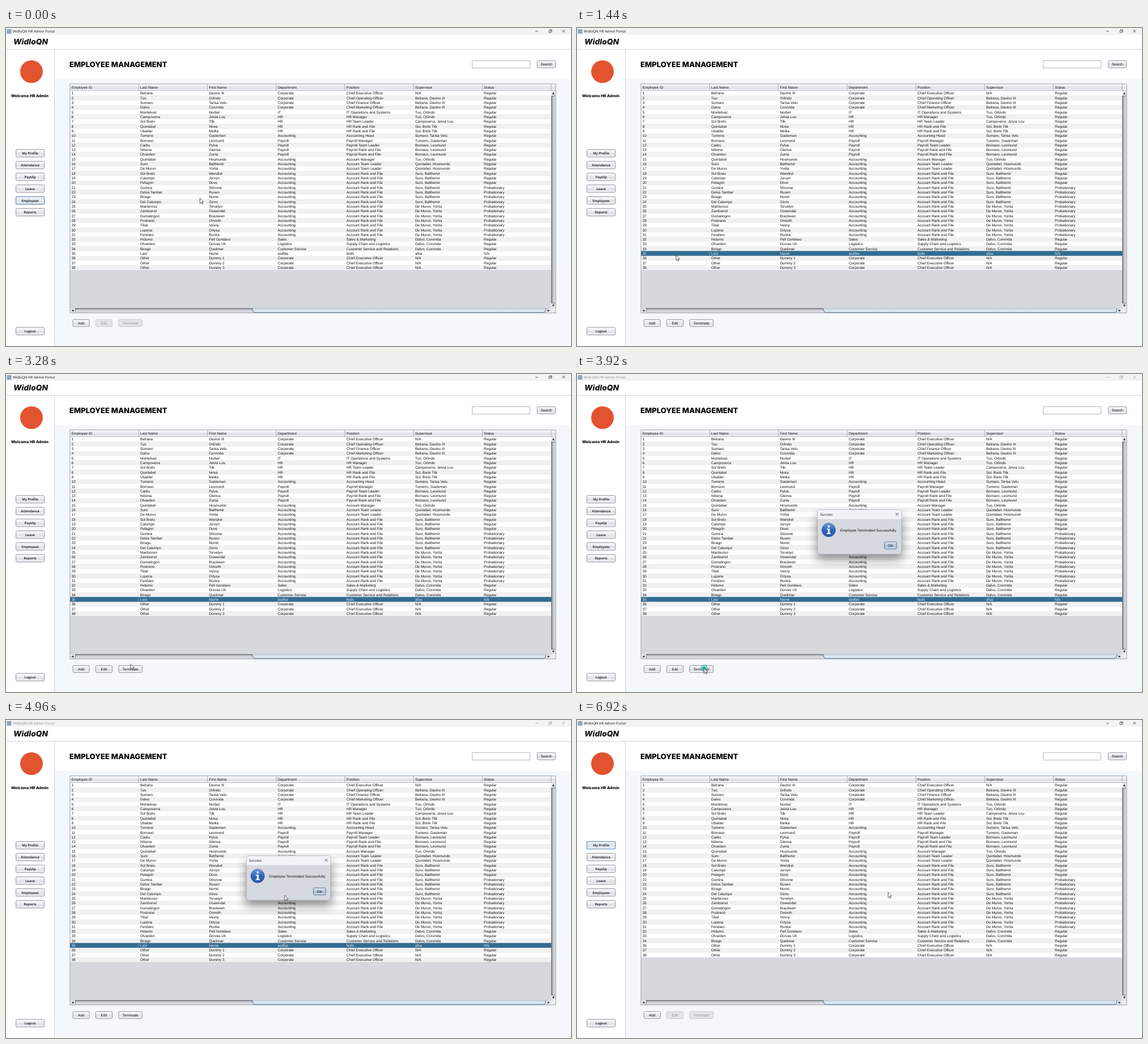
Animation, 998 px wide and 561 px high, one loop 7.48 s. Source, as an HTML page:

```html
<!DOCTYPE html>
<html lang="en">
<head>
<meta charset="utf-8">
<title>Employee Management</title>
<style>
  html, body { margin: 0; height: 100%; overflow: hidden; background: #fff; }
  svg { display: block; width: 100vw; height: 100vh; }
  text { font: 6.4px "Liberation Sans", Arial, sans-serif; fill: #111; white-space: pre; text-rendering: geometricPrecision; }
  .ui { font: 6.1px "Open Sans", sans-serif; }
  .nav { font: 600 5.9px "Open Sans", sans-serif; }
  .brand { font: italic 800 13.8px Inter, sans-serif; }
  .head { font: 800 13.05px Inter, sans-serif; fill: #000; }
  .hello { font: 800 6.8px Inter, sans-serif; fill: #000; }
  .mid { text-anchor: middle; }
  .btn rect { fill: url(#face); stroke: #858a94; stroke-width: .9; }
  .btn.focus rect { fill: url(#glow); stroke: #5f86ad; stroke-width: 1.1; }
  .btn.main rect { fill: url(#blue); stroke: #4f6a88; }
  .btn.off rect { fill: #e2e5e8; stroke: #c2c6cb; }
  .btn.off text { fill: #929599; }
  .picked text { fill: #e6eef4; }
  .inactive text { fill: #8c8c8c; }
  .inactive path { stroke: #999; }
</style>
</head>
<body>
<svg id="stage" viewBox="0 0 998 561" preserveAspectRatio="none"></svg>
<script>
const LOOP = 7480, STEP = 40, ROW = 8.316, TOP = 111, COL = 121.4, LEFT = 113;

const people = `Belrana|Davino III
Tuo|Orlindo
Sumaro|Tarisa Velu
Dalvo|Corvinda
Montelvaz|Norbel
Campoverra|Jelvia Lou
Sol Brelo|Tilk
Quintabel|Nirea
Ubalder|Melka
Tumeno|Gasteman
Bornavo|Leomund
Cadru|Pylva
Nibona|Glenva
Olvarden|Zunia
Quintabel|Hosmundo
Suro|Balthemir
De Murvo|Yorita
Sol Brelo|Wendrel
Calumpo|Jorvyn
Pelagrin|Dovo
Gumira|Shivone
Delos Tamber|Ruxen
Birago|Nomri
Del Calumpo|Ginro
Maribonso|Torvelyn
Zamborrel|Oswendal
Dumalingon|Brackwen
Postrano|Omreth
Tibal|Vesny
Lupona|Ortysa
Fendaro|Runka
Hidumo|Pell Gondavo
Olvarden|Dorvas Uli
Birago|Quelimar
Last|Name
Other|Dummy 1
Other|Dummy 2
Other|Dummy 3`.split('\n').map(s => s.split('|'));

// "a*3|b" -> [a, a, a, b]
const runs = s => s.split('|').flatMap(p => {
  const [v, n = 1] = p.split('*');
  return Array(+n).fill(v);
});
const dept = runs('Corporate*4|IT|HR*4|Accounting|Payroll*4|Accounting*17|Sales|Logistics|Customer Service|asdfas|Corporate*3');
const position = runs('Chief Executive Officer|Chief Operating Officer|Chief Finance Officer|Chief Marketing Officer|IT Operations and Systems|HR Manager|HR Team Leader|HR Rank and File*2|Accounting Head|Payroll Manager|Payroll Team Leader|Payroll Rank and File*2|Account Manager|Account Team Leader*2|Account Rank and File*14|Sales &amp; Marketing|Supply Chain and Logistics|Customer Service and Relations|fasfs|Chief Executive Officer*3');
const boss = runs('N/A|Belrana, Davino III*3|Tuo, Orlindo*2|Campoverra, Jelvia Lou|Sol, Brelo Tilk*2|Sumaro, Tarisa Velu|Tumeno, Gasteman|Bornavo, Leomund*3|Tuo, Orlindo|Quintabel, Hosmundo*2|Suro, Balthemir*7|De Murvo, Yorita*7|Dalvo, Corvinda*3|afsa|N/A*3');
const state = runs('Regular*20|Probationary*11|Regular*3|fsfs|Regular*3');

const rect = (x, y, w, h, fill, more = '') => `<rect x="${x}" y="${y}" width="${w}" height="${h}" fill="${fill}" ${more}/>`;
const text = (x, y, s, cls = '') => `<text x="${x}" y="${y}" class="${cls}">${s}</text>`;
const line = (d, color, w = .8, more = '') => `<path d="${d}" fill="none" stroke="${color}" stroke-width="${w}" ${more}/>`;
const tri = d => `<path d="${d}z" fill="#333"/>`;
const group = (id, inner, more = '') => `<g id="${id}" ${more}>${inner}</g>`;
const button = (id, x, cy, w, h, label, cls = '', font = '') =>
  group(id, rect(x, cy - h / 2, w, h, '', 'rx="2.2"') + text(x + w / 2, cy + 2.3, label, 'mid ' + font), `class="btn ${cls}"`);
const grad = (id, dir, stops) => `<linearGradient id="${id}" ${dir}>` +
  stops.map(([o, c]) => `<stop offset="${o}" stop-color="${c}"/>`).join('') + '</linearGradient>';
const down = 'x2="0" y2="1"';

const defs = '<defs>' +
  grad('face', down, [[0, '#fcfcfd'], [.5, '#e5e8ec'], [.55, '#dbdee3'], [1, '#f2f3f5']]) +
  grad('glow', down, [[0, '#f1f5f9'], [.5, '#dbe3ec'], [1, '#e9eff5']]) +
  grad('blue', down, [[0, '#dfe9f3'], [.5, '#b4c8dc'], [.55, '#a2bad2'], [1, '#cfdfee']]) +
  grad('thumb', down, [[0, '#c3cfdb'], [.4, '#dde6ee'], [1, '#d6e6f4']]) +
  grad('track', down, [[0, '#a9adb4'], [.4, '#cdd0d6'], [1, '#dee0e4']]) +
  grad('side', '', [[0, '#8f949b'], [.4, '#c3c7cd'], [1, '#dadde2']]) +
  grad('orb', down, [[0, '#6f9be0'], [.5, '#2f63b8'], [1, '#2a58ad']]) +
  '<filter id="soft" x="-30%" y="-50%" width="160%" height="200%"><feGaussianBlur stdDeviation="9"/></filter></defs>';

const frame = rect(0, 0, 998, 561, '#fff') +
  rect(86, 90, 912, 471, '#f4f8fb') +
  rect(0, 0, 998, 12, '#f3f3f3') +
  rect(1.5, 2, 8, 8, '#8fa5bb') +
  group('bar', text(12, 8.4, 'WidloQN HR Admin Portal', 'ui') +
    line('M935 5.8h5M959 4.2h3.8v3.8h-3.8zM960.2 3h3.8v3.8M982.3 3l5 5m0-5l-5 5', '#222', .7)) +
  line('M0 37.7H998M85.5 38V561', '#c4c6c9') +
  text(13, 29.3, 'WidloQN', 'brand') +
  '<circle cx="45" cy="77" r="20" fill="#e4532f"/>' +
  text(9, 122.3, 'Welcome HR Admin', 'hello') +
  text(112, 69.3, 'EMPLOYEE MANAGEMENT', 'head') +
  rect(823.5, 57.7, 102, 13, '#fff', 'stroke="#a3a7ad" stroke-width=".8"') +
  button('search', 938.3, 64, 32.5, 12.6, 'Search') +
  ['My Profile', 'Attendance', 'Payslip', 'Leave', 'Employees', 'Reports'].map((s, i) =>
    button('nav' + i, 17.5, 221 + i * 20.8, 50.3, 13.4, s, '', 'nav')).join('') +
  button('logout', 17.5, 534.8, 50.3, 13.4, 'Logout', '', 'nav') +
  button('add', 118, 520.5, 29.3, 12.4, 'Add') +
  button('edit', 158.4, 520.5, 29.3, 12.4, 'Edit') +
  button('term', 199, 520.5, 41.7, 12.4, 'Terminate');

const heads = ['Employee ID', 'Last Name', 'First Name', 'Department', 'Position', 'Supervisor', 'Status'];
const cells = (vals, y) => vals.map((s, k) => text(LEFT + 2.7 + k * COL, y, s)).join('');
const rowText = i => cells([i + 1, ...people[i], dept[i], position[i], boss[i], state[i]], TOP + ROW * (i + .5) + 2.2);
const span = (a, b) => Array.from({ length: b - a }, (_, i) => rowText(a + i)).join('');
const pickY = TOP + ROW * 34 - .4;

const table = rect(113, 98.7, 858, 404, '#d5d8dd') +
  rect(113, 98.7, 850, 12, 'url(#face)') +
  rect(963, 98.7, 8, 12, 'url(#face)') +
  cells(heads, 107.1) +
  line(heads.map((_, k) => `M${LEFT + COL * (k + 1)} 99v11.5`).join(''), '#9a9ea6') +
  line('M113 110.7H971', '#9fa3aa') +
  people.map((_, i) => rect(113, TOP + ROW * i, 850, ROW, i % 2 ? '#f1f1f2' : '#fff', `id="stripe${i}"`)).join('') +
  group('pick', rect(113, pickY, 850, ROW + .2, '#336c92') + line(`M234.2 ${pickY + .5}v7.3`, '#9db8ca', .7)) +
  span(0, 34) + group('doomed', rowText(34)) + group('tail', span(35, 38)) +
  // vertical scrollbar
  rect(963, 111, 8, 383.5, 'url(#side)') +
  rect(963, 111, 8, 8.5, '#e6e8eb') + rect(963, 486, 8, 8.5, '#e6e8eb') +
  line('M964 119.5V486', '#555b63', 1) + line('M963.5 121.5q3-2 6.5-2M963.5 484q3 2 6.5 2', '#555b63') +
  tri('M966.8 113l2 4h-4') + tri('M966.8 492l2-4h-4') +
  // horizontal scrollbar
  rect(113, 494.5, 850, 8, 'url(#track)') +
  rect(113, 494.5, 9, 8, '#e6e8eb') + rect(954, 494.5, 9, 8, '#e6e8eb') +
  line('M122 495H436', '#4c5259', 1) + line('M124 495q-2 2-2 6', '#555b63') +
  '<path d="M434.5 494.7q1.5 7.3 6 7.3H948q5 0 6-7.3z" fill="url(#thumb)"/>' +
  line('M434.5 494.7q1.5 7.3 6 7.3H948q5 0 6-7.3', '#3c668d', 1) +
  tri('M115.3 498.5l4-2v4') + tri('M960.7 498.5l-4-2v4') +
  rect(963, 494.5, 8, 8, '#eceef0') +
  rect(113, 98.7, 858, 404, 'none', 'stroke="#8b9098" stroke-width=".8"');

const dialog = group('dialog',
  rect(423, 250, 152, 78, '#000', 'rx="6" opacity=".4" filter="url(#soft)"') +
  rect(424.5, 239.5, 149, 78.5, '#d6d9df', 'rx="4" stroke="#9a9da3" stroke-width=".7"') +
  '<path d="M424.8 256v-12.5q0-3.7 3.7-3.7h141q3.7 0 3.7 3.7V256z" fill="#f1f3f8"/>' +
  text(429.5, 249.8, 'Success', 'ui') +
  line('M563 244.8l5 5m0-5l-5 5', '#222', .8) +
  '<circle cx="444.5" cy="275.2" r="12" fill="url(#orb)" stroke="#234b92" stroke-width=".7"/>' +
  '<circle cx="444.7" cy="269" r="2" fill="#fff"/>' +
  '<path d="M441.3 272.8h5v7.7h2v2h-7v-2h2v-5.7h-2z" fill="#fff"/>' +
  text(465, 277.5, 'Employee Terminated Successfully') +
  button('ok', 543, 302.4, 21.7, 12.6, 'OK', 'main'));

const pointer = group('ring',
  '<circle id="halo" fill="none" stroke="#16b3ad" stroke-width="1.2"/><circle r="3.3" fill="#18b5a4"/>') +
  group('arrow', '<path d="M0 0V9.3L2.1 7.4 3.6 10.6 5 10 3.6 6.9H6.5z" fill="#fff" stroke="#222" stroke-width=".7"/>');

document.getElementById('stage').innerHTML = defs + frame + table + dialog + pointer;

const el = id => document.getElementById(id);
const show = (id, on) => el(id).style.display = on ? '' : 'none';
const flag = (id, cls, on) => el(id).classList.toggle(cls, on);
const move = (id, x, y) => el(id).setAttribute('transform', `translate(${x} ${y})`);
const mix = (a, b, u) => a + (b - a) * u;

// pointer path: time, x, y
const path = [[0, 342.5, 300], [200, 245, 362], [360, 167.5, 408], [560, 167.5, 408], [600, 175, 400.5],
  [2200, 175, 400.5], [2920, 149, 472.5], [3280, 220, 511.5], [3680, 224.5, 519], [4560, 224.5, 519],
  [4760, 375, 400], [4960, 492, 309], [5200, 549, 303.5], [5800, 549, 303.5], [5840, 549.5, 304], [LOOP, 549.5, 304]];
// clicks: start, growth time, end, first and last radius
const clicks = [[1040, 40, 1440, 5, 6], [3840, 320, 4400, 4, 9.3], [6120, 200, 6480, 4, 8.3]];

function draw(t) {
  const k = path.findIndex(p => p[0] > t), [a, x0, y0] = path[k - 1], [b, x1, y1] = path[k];
  const u = (t - a) / (b - a), x = mix(x0, x1, u), y = mix(y0, y1, u);
  move('arrow', x, y);
  move('ring', x, y);
  const hit = clicks.find(c => t >= c[0] && t < c[2]);
  show('ring', hit);
  if (hit) el('halo').setAttribute('r', mix(hit[3], hit[4], Math.min(1, (t - hit[0]) / hit[1])));

  const gone = t >= 6920, picked = t >= 1040 && !gone, open = t >= 3880 && t < 6160;
  show('pick', picked);
  flag('doomed', 'picked', picked);
  show('doomed', !gone);
  show('stripe37', !gone);
  move('tail', 0, gone ? -ROW : 0);
  for (const id of ['edit', 'term']) flag(id, 'off', t < 1440 || gone);
  flag('nav4', 'focus', t < 1040);
  flag('nav0', 'focus', gone);
  show('dialog', open);
  flag('bar', 'inactive', open);
}

function tick() {
  draw(Math.floor(performance.now() % LOOP / STEP) * STEP);
  requestAnimationFrame(tick);
}
tick();
</script>
</body>
</html>
```
